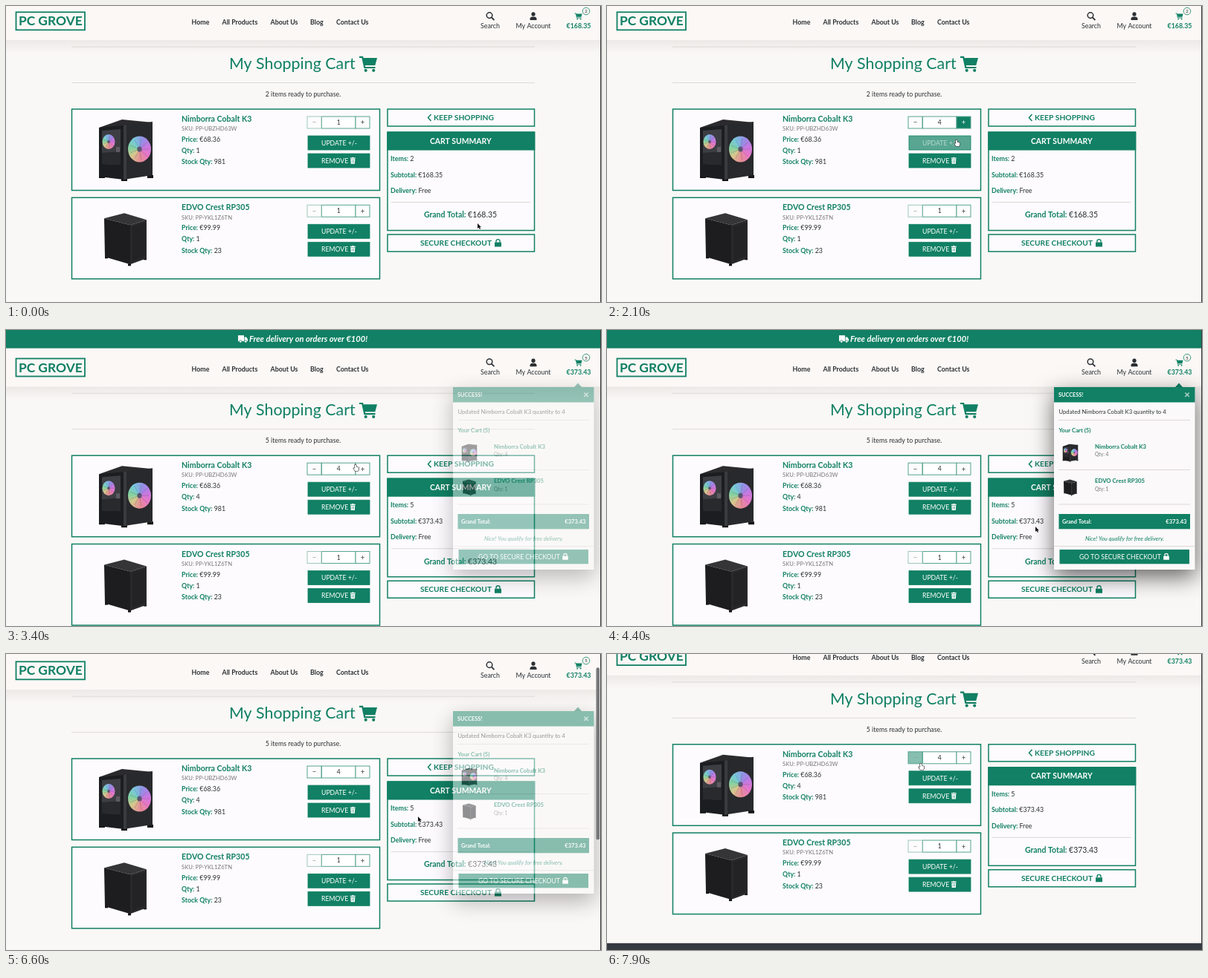
These frames come from a looping animation (800 by 399 pixels, 8 s). An HTML page with a canvas:

```html
<!DOCTYPE html>
<html lang="en">
<head>
<meta charset="utf-8">
<title>Shopping cart</title>
<style>
  html, body { margin: 0; width: 100%; height: 100%; overflow: hidden; background: #faf8f6; }
  canvas { display: block; }
</style>
</head>
<body>
<canvas id="stage" width="800" height="399"></canvas>
<script>
const LOOP = 8000, TOP = 30.2, GREEN = '#118064', INK = '#2c3034', GREY = '#777', LINE = '#dddad8', BG = '#faf8f6';
const stage = document.getElementById('stage').getContext('2d');
let c = stage;

const PRODUCTS = [
  { name: 'Nimborra Cobalt K3', sku: 'PP-UBZHD63W', price: '€68.36', stock: 981, draw: glassCase },
  { name: 'EDVO Crest RP305', sku: 'PP-YKL1Z6TN', price: '€99.99', stock: 23, draw: meshCase }
];

// time, x, y of the pointer tip
const PATH = [[0, 634, 293], [100, 634, 293], [900, 479, 155], [1750, 479, 155], [2080, 469, 181],
  [3750, 469, 182], [4350, 576, 265], [4450, 576, 265], [4950, 622, 258], [5050, 622, 258],
  [5900, 634, 180], [6150, 634, 180], [6580, 554, 219], [6800, 551, 221], [7150, 551, 221], [7780, 421, 148]];

const ramp = (t, a, b) => Math.min(1, Math.max(0, (t - a) / (b - a)));
const smooth = p => p * p * (3 - 2 * p);
const ease = (t, a, b) => smooth(ramp(t, a, b));
const within = (t, a, b) => t >= a && t < b;

function mix(from, to, p) {
  const v = from.map((n, i) => Math.round(n + (to[i] - n) * p));
  return `rgb(${v})`;
}
const WHITE_RGB = [253, 252, 253], GREEN_RGB = [17, 128, 100];

function text(s, x, y, size, color = INK, style = '', align = 'left') {
  c.font = `${style} ${size}px Lato, sans-serif`;
  c.fillStyle = color;
  c.textAlign = align;
  c.fillText(s, x, y + size * .36);
  return c.measureText(s).width;
}

function pair(label, value, x, y, size = 8.85, centred = false) {
  if (centred) {
    c.font = `bold ${size}px Lato, sans-serif`;
    const w = c.measureText(label + ' ').width;
    c.font = `${size}px Lato, sans-serif`;
    x -= (w + c.measureText(value).width) / 2;
  }
  text(value, x + text(label + ' ', x, y, size, GREEN, 'bold'), y, size);
}

function rect(x, y, w, h, fill, stroke, width = 1.5) {
  if (fill) { c.fillStyle = fill; c.fillRect(x, y, w, h); }
  if (stroke) { c.strokeStyle = stroke; c.lineWidth = width; c.strokeRect(x, y, w, h); }
}

const rule = (x1, x2, y) => rect(x1, y, x2 - x1, 1, LINE);

function poly(fill, ...p) {
  c.beginPath();
  for (let i = 0; i < p.length; i += 2) c.lineTo(p[i], p[i + 1]);
  c.closePath();
  c.fillStyle = fill;
  c.fill();
}

function oval(x, y, rx, ry, fill, stroke, width = 1) {
  c.beginPath();
  c.ellipse(x, y, rx, ry, 0, 0, 7);
  if (fill) { c.fillStyle = fill; c.fill(); }
  if (stroke) { c.strokeStyle = stroke; c.lineWidth = width; c.stroke(); }
}

function stroke(path, color, width) {
  c.strokeStyle = color;
  c.lineWidth = width;
  c.stroke(new Path2D(path));
}

function at(x, y, scale, draw) {
  c.save();
  c.translate(x, y);
  c.scale(scale, scale);
  draw();
  c.restore();
}

// ---- icons ----
function cartIcon() {
  stroke('M0 1.3H4.2L7.3 15.5H21.5', GREEN, 2.2);
  poly(GREEN, 5, 2.5, 24, 2.5, 21.3, 12.6, 7.2, 12.6);
  oval(8.7, 19.3, 2.1, 2.1, GREEN);
  oval(19.2, 19.3, 2.1, 2.1, GREEN);
}

function lockIcon(color) {
  rect(-4.5, -1, 9, 6, color);
  stroke('M-2.5 -1V-2.4A2.5 2.5 0 0 1 2.5 -2.4V-1', color, 1.4);
}

function trashIcon() {
  rect(-3.5, -4, 7, 1.2, '#fff');
  rect(-1.2, -4.6, 2.4, 1, '#fff');
  poly('#fff', -3, -2.2, 3, -2.2, 2.6, 4.3, -2.6, 4.3);
  for (const x of [-1.3, 0, 1.3]) rect(x - .2, -1, .4, 4, GREEN);
}

function truckIcon() {
  rect(0, -5, 8, 8, '#fff');
  poly('#fff', 8.6, -2.6, 11, -2.6, 13, 0, 13, 3, 8.6, 3);
  for (const x of [3.2, 10.2]) oval(x, 3.3, 1.7, 1.7, '#fff', GREEN, .7);
}

// ---- products, drawn around their centre ----
function fan(x, y, rx, ry) {
  const hues = ['#e678c8', '#e68c96', '#d7c88c', '#82d2a0', '#78c8dc', '#968ce6', '#c878e1', '#e678c8'];
  const g = c.createConicGradient(.6, x, y);
  hues.forEach((h, i) => g.addColorStop(i / 7, h));
  oval(x, y, rx, ry, g);
  for (let i = 0; i < 9; i++) {
    const a = i * Math.PI * 2 / 9;
    stroke(`M${x} ${y}L${x + rx * .85 * Math.cos(a)} ${y + ry * .85 * Math.sin(a)}`, 'rgba(60,50,80,.3)', .7);
  }
  oval(x, y, rx * .2, ry * .2, '#5a5470');
}

function glassCase() {
  for (const [x, y] of [[-36, 37], [-6, 41], [29, 37]]) rect(x, y - 3, 8, 4, '#151515');
  poly('#2b2b2e', -36, -30, -5, -41, 36, -37, -3, -29);
  poly('#1c1d20', -36, -30, -3, -33, -3, 40, -36, 36);
  poly('#3c3e43', -32, -26, -7, -28, -7, 20, -32, 19);
  poly('#282a2e', -32, 4, -7, 2, -7, 20, -32, 19);
  fan(-23, -11, 8.5, 10);
  rect(-13, -4, 5, 7, '#5e5a62');
  poly('#28292c', -3, -33, 36, -38, 36, 34, -3, 40);
  poly('#3a3b3f', -3, -33, 1, -33.5, 1, 39.5, -3, 40);
  fan(18.5, -1, 15.5, 17.5);
}

function meshCase() {
  for (const [x, y] of [[-28, 25], [3, 35], [24, 27]]) rect(x, y - 1, 4, 3, '#111');
  poly('#353537', -29, -27, -2, -34, 28, -25, 6, -18);
  poly('#1d1d1f', -29, -27, 6, -18, 6, 35, -28, 25);
  poly('#29292b', 6, -18, 28, -25, 28, 27, 6, 35);
  poly('#232325', 9, -16, 26, -21.5, 26, 24, 9, 31);
}

// ---- page ----
function stepCell(x, y, sign, hover, faded) {
  rect(x, y, 19, 16, mix(WHITE_RGB, GREEN_RGB, hover), faded ? '#9fc8bb' : '#58a48f', 1);
  text(sign, x + 9.5, y + 8, 9.5, faded ? '#999' : mix([50, 60, 60], WHITE_RGB, hover), '', 'center');
}

function button(y, label, hover = 0) {
  rect(406, y, 83, 19, mix(GREEN_RGB, WHITE_RGB, hover), GREEN, .8);
  text(label, 424, y + 9.6, 8.7, mix([255, 255, 255], GREEN_RGB, hover));
}

function card(p, y, count, qty, hover) {
  rect(88.5, y, 414, 109.5, '#fdfbfd', GREEN);
  at(161, y + 55, 1, p.draw);
  text(p.name, 236, y + 13.2, 10.6, GREEN, 'bold');
  text('SKU: ' + p.sku, 236, y + 26.5, 7.7, GREY);
  pair('Price:', p.price, 236, y + 41);
  pair('Qty:', qty, 236, y + 56);
  pair('Stock Qty:', p.stock, 236, y + 71.3);
  rect(424.5, y + 10, 45.5, 16, '#fff', '#58a48f', 1);
  stepCell(405, y + 10, '−', hover.minus, count === 1);
  stepCell(470, y + 10, '+', hover.plus);
  text(count, 447.3, y + 18, 8.5, INK, '', 'center');
  button(y + 36, 'UPDATE +/-', hover.update);
  button(y + 60, 'REMOVE');
  at(466.3, y + 69.5, 1, trashIcon);
}

function header(s) {
  const shade = c.createLinearGradient(0, 46, 0, 64);
  shade.addColorStop(0, 'rgba(60,40,40,.075)');
  shade.addColorStop(1, 'rgba(60,40,40,0)');
  rect(0, 46, 800, 18, shade);
  rect(0, -6, 800, 52, '#fbf8f6');
  rect(0, -31, 800, 25.4, GREEN);
  at(312, -18, 1, truckIcon);
  text('Free delivery on orders over €100!', 327, -18, 11.1, '#fff', 'italic bold');

  rect(13.5, 8.3, 92.5, 24, null, GREEN, 1.8);
  text('PC GROVE', 59.8, 20.2, 17.4, GREEN, 'bold', 'center');
  [['Home', 249.5], ['All Products', 290.5], ['About Us', 355.5], ['Blog', 409], ['Contact Us', 444]]
    .forEach(([label, x]) => text(label, x, 22.3, 8.85, INK, 'bold'));

  oval(650, 12.6, 3.8, 3.8, null, INK, 1.5);
  stroke('M652.8 15.4L656.4 19', INK, 1.8);
  text('Search', 651, 27, 8.85, INK, '', 'center');
  oval(709, 11, 2.6, 2.8, INK);
  c.beginPath();
  c.roundRect(704.4, 14.6, 9.2, 4.4, [4, 4, 1, 1]);
  c.fill();
  text('My Account', 709, 27, 8.85, INK, '', 'center');
  at(764.5, 9.5, .42, cartIcon);
  oval(780, 7, 4.8, 4.8, '#fbf8f6', GREEN, .8);
  text(s.items, 780, 7, 6.5, INK, '', 'center');
  text(s.total, 770, 27, 8.85, GREEN, 'bold', 'center');
}

function summary(s) {
  rect(513, 139, 197.5, 23, '#fdfbfd', GREEN);
  stroke('M571.5 146L567.5 150.5L571.5 155', GREEN, 1.5);
  text('KEEP SHOPPING', 575, 150.5, 10.3, GREEN, 'bold');
  rect(513, 170, 197.5, 132.5, '#fdfbfd', GREEN);
  rect(512.3, 169.5, 199, 25, GREEN);
  text('CART SUMMARY', 611.3, 181.8, 10.4, '#fff', 'bold', 'center');
  pair('Items:', s.items, 517, 205.7);
  pair('Subtotal:', s.total, 517, 227.4);
  pair('Delivery:', 'Free', 517, 249.1);
  rule(518, 705, 264);
  pair('Grand Total:', s.total, 611, 281.6, 10.5, true);
  rect(513, 308, 197.5, 23, '#fdfbfd', GREEN);
  text('SECURE CHECKOUT', 557, 319.6, 10.2, GREEN, 'bold');
  at(661.5, 319.5, 1, () => lockIcon(GREEN));
}

function page(t, s, scroll) {
  rect(0, 0, 800, 399, BG);
  c.save();
  c.translate(0, TOP - scroll);
  header(s);
  rule(88, 711, 54.6);
  text('My Shopping Cart', 300, 77.5, 21.4, GREEN);
  at(475, 67.5, 1, cartIcon);
  rule(88, 711, 103);
  text(s.items + ' items ready to purchase.', 399.5, 119, 8.8, INK, '', 'center');
  card(PRODUCTS[0], 139, s.count, s.qty, {
    plus: ramp(t, 880, 1200) * (1 - ramp(t, 3000, 3250)),
    minus: ramp(t, 7700, 8100),
    update: s.updated ? 0 : ramp(t, 1980, 2380)
  });
  card(PRODUCTS[1], 258.3, 1, 1, { plus: 0, minus: 0, update: 0 });
  summary(s);
  rect(0, 407, 800, 60, '#343a40');
  c.restore();
}

// ---- notice under the cart icon ----
function notice() {
  poly(GREEN, 764, 77, 769, 71.5, 774, 77);
  c.shadowColor = 'rgba(0,0,0,.6)';
  c.shadowBlur = 28;
  c.shadowOffsetY = 10;
  rect(601, 77, 189.5, 246, '#fbf9f9');
  c.shadowColor = 'transparent';
  rect(601, 77, 189.5, 20.5, GREEN);
  text('SUCCESS!', 607, 87.5, 7.3, '#fff', 'bold');
  stroke('M777.3 84.5L782.7 89.9M782.7 84.5L777.3 89.9', '#a6cec2', 1.5);
  text(`Updated ${PRODUCTS[0].name} quantity to 4`, 607.5, 110.3, 7.7);
  rule(607, 784, 121);
  text('Your Cart (5)', 607.5, 135, 7.7, GREEN, 'bold');
  PRODUCTS.forEach((p, i) => {
    const y = 157 + i * 46.5;
    at(623, y + 8.5, i ? .31 : .285, p.draw);
    text(p.name, 656, y, 7.75, GREEN, 'bold');
    text('Qty: ' + (i ? 1 : 4), 656, y + 10.8, 6.7, GREY);
    rule(607, 784, y + 31);
  });
  rect(607.5, 248, 176.5, 20.3, GREEN);
  text('Grand Total:', 612, 258.3, 7.3, '#fff', 'bold');
  text('€373.43', 779.5, 258.3, 7.6, '#fff', 'bold', 'right');
  text('Nice! You qualify for free delivery.', 696, 281, 7.7, GREEN, 'italic', 'center');
  rule(601, 790, 291);
  rect(608.5, 296, 174.5, 19.3, GREEN);
  text('GO TO SECURE CHECKOUT', 635, 305.8, 8.6, '#fff');
  at(752, 305.5, .85, () => lockIcon('#fff'));
}

const layer = document.createElement('canvas');
layer.width = 800;
layer.height = 399;
c = layer.getContext('2d');
notice();
c = stage;

// ---- pointer ----
function outlined(path, fill, edge) {
  const shape = new Path2D(path);
  c.lineJoin = 'round';
  c.lineWidth = 1.2;
  c.strokeStyle = edge;
  c.stroke(shape);
  c.fillStyle = fill;
  c.fill(shape);
}

function pointer(t) {
  let i = PATH.findIndex(k => k[0] > t);
  if (i < 0) i = PATH.length;
  const a = PATH[i - 1], b = PATH[i] || a;
  const p = a === b ? 0 : ease(t, a[0], b[0]);
  at(a[1] + (b[1] - a[1]) * p, a[2] + (b[2] - a[2]) * p, 1, () => {
    if (within(t, 850, 3850) || t > 7720)
      outlined('M0 0Q1-1 1.7 0L2 2.6L5.5 3.6L5.2 6.5L4.2 8H.4L-1.9 4.8Q-1.6 3.6 .2 4.6Z', '#fff', '#222');
    else if (within(t, 5800, 6200))
      stroke('M-1.8-4Q0-4 0-3V3Q0 4-1.8 4M1.8-4Q0-4 0-3V3Q0 4 1.8 4', '#222', .9);
    else
      outlined('M0 0V7L1.7 5.6L2.8 8L4 7.5L3 5.2H5Z', '#111', '#fff');
  });
}

function draw(t) {
  const updated = t >= 3400;
  const state = {
    updated,
    items: updated ? 5 : 2,
    total: updated ? '€373.43' : '€168.35',
    qty: updated ? 4 : 1,
    count: 1 + (t >= 1100) + (t >= 1300) + (t >= 1500)
  };
  const scroll = updated ? 47.4 * ease(t, 6280, 6850) : TOP;
  page(t, state, scroll);

  c.globalAlpha = updated ? ramp(t, 3270, 3570) * (1 - ramp(t, 6450, 6745)) : 0;
  c.drawImage(layer, 0, 0);
  c.globalAlpha = ramp(t, 6250, 6350) * (1 - ramp(t, 7200, 7450));
  c.fillStyle = '#77787a';
  c.beginPath();
  c.roundRect(793.5, 2 + scroll * .58, 4.5, 232, 2.2);
  c.fill();
  c.globalAlpha = 1;
  rect(799, 0, 1, 399, '#3a3a3a');
  pointer(t);
}

function frame(now) {
  draw(now % LOOP);
  requestAnimationFrame(frame);
}
requestAnimationFrame(frame);
</script>
</body>
</html>
```
